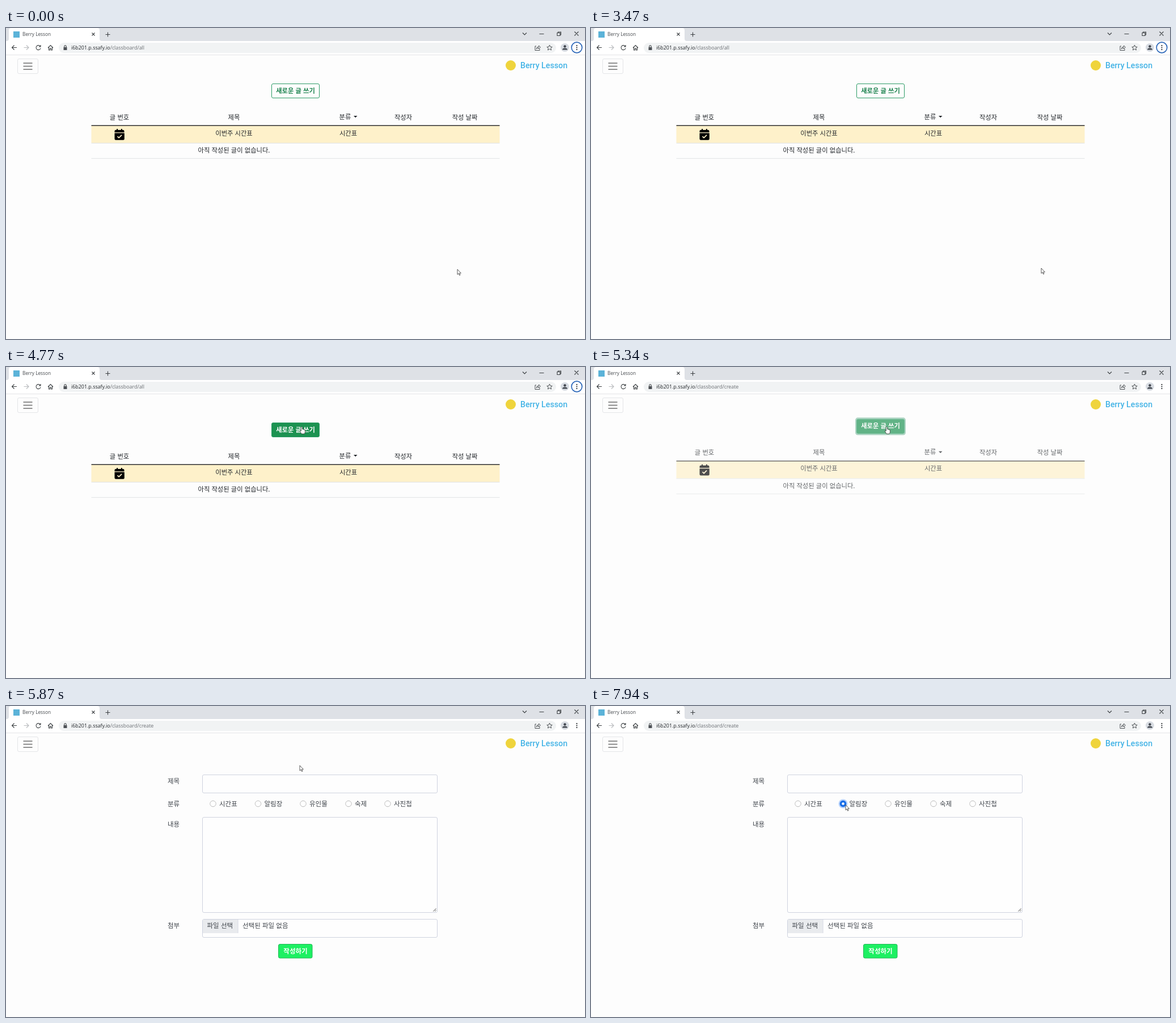
Recreate the animation shown at these times as an HTML page. Size 1021x549 px, loop 8 s.

```html
<!DOCTYPE html>
<html lang="ko">
<head>
<meta charset="utf-8">
<style>
html, body { margin: 0; width: 100%; height: 100%; overflow: hidden; background: #fdfdfd; }
svg { display: block; }
text { font: 11.3px "Noto Sans CJK KR", "Noto Sans CJK", sans-serif; fill: #212529; }
.ui { font-family: "Open Sans", sans-serif; }
.mid { text-anchor: middle; }
.bold { font-weight: 700; }
.line { fill: none; stroke: #3c4043; stroke-width: 1.1; }
.field { fill: #fefefe; stroke: #cfd3df; }
.radio { fill: #fff; stroke: #bdbdbd; }
#form text { fill: #3f444b; font-size: 11.5px; }
</style>
</head>
<body>
<svg width="1021" height="549" viewBox="0 0 1021 549">
  <!-- browser frame -->
  <path fill="#dee1e6" d="M0 0H1021V23H0Z"/>
  <path fill="#fff" d="M0 23H1021V47H0ZM1 23Q5 23 5 19V4Q5 0 9 0H161Q165 0 165 4V19Q165 23 169 23Z"/>
  <path fill="#e3e4e7" d="M0 47H1021V48H0Z"/>
  <rect x="13" y="6" width="11" height="11" fill="#5bb3d8"/>
  <text class="ui" x="29" y="14" style="font-size:8.3px;fill:#45494d">Berry Lesson</text>
  <path class="line" d="M151.500 8.500l5 5m0-5l-5 5M175.500 11.500h8m-4-4v8"/>
  <path class="line" d="M911 8.500l3.500 3.500 3.500-3.500M940.500 10.500h8M1002.500 6.500l7 7m0-7l-7 7"/>
  <path class="line" d="M972 8.500h5v5h-5zM973.500 8V7h5v5h-1"/>
  <rect x="93" y="26" width="877" height="18" rx="9" fill="#f1f3f4"/>
  <path class="line" d="M19 34.500h-8.500m4-4l-4 4 4 4M60.500 32.500a4 4 0 1 0 .5 3m0-5.500v3h-3M74 35l4.500-4.500L83 35M75.500 34v5h2v-3h2v3h2v-5"/>
  <path class="line" style="stroke:#b9bbbe" d="M31.500 34.500H40m-4-4l4 4-4 4"/>
  <path fill="#4d5156" d="M101.500 34h6v5h-6z"/>
  <path class="line" d="M102.800 34v-1.500a1.700 1.700 0 0 1 3.400 0V34"/>
  <text class="ui" x="115" y="38" style="font-size:8.9px">i6b201.p.ssafy.io<tspan id="path" fill="#6b6f74"></tspan></text>
  <path class="line" style="stroke-width:.9" d="M935 32h-2v7.500h8V37M935.500 37q0-4 4-4v-2l3 3-3 3v-2q-2.500 0-4 2z"/>
  <path class="line" style="stroke-width:.9" d="M958.500 30l1.400 3.200 3.300.3-2.500 2.200.8 3.300-3-1.800-3 1.800.8-3.300-2.500-2.200 3.300-.3z"/>
  <circle cx="985.500" cy="34.500" r="7.500" fill="#d9dde3"/>
  <path fill="#42474f" d="M981 38.500q0-3 4.500-3t4.500 3z"/>
  <circle cx="985.500" cy="32.500" r="2.200" fill="#42474f"/>
  <path fill="#3c4043" d="M1005.500 30h2v2h-2zm0 3.500h2v2h-2zm0 3.500h2v2h-2z"/>
  <circle id="menuRing" cx="1006.500" cy="34.500" r="9.300" fill="none" stroke="#2a66b8" stroke-width="1.700"/>

  <!-- site header -->
  <rect x="20.500" y="54.500" width="36" height="26" rx="2.500" fill="none" stroke="#e4e5e8"/>
  <path stroke="#6c6c6c" stroke-width="1.400" d="M30.500 62h16m-16 5.500h16m-16 5.500h16"/>
  <circle cx="890" cy="66" r="9" fill="#efd43c"/>
  <text x="907" y="71" style="font:500 14.200px Roboto,sans-serif;fill:#42b3e6">Berry Lesson</text>

  <g id="list">
    <rect id="ring" x="466" y="95.500" width="89" height="31" rx="4.500" fill="#198754" fill-opacity=".5"/>
    <rect id="write" x="468.500" y="98.500" width="84" height="25" rx="2.500" stroke="#2c9b66"/>
    <text id="writeText" class="mid bold" x="510.500" y="114.500">새로운 글 쓰기</text>
    <g class="bold">
      <text class="mid" x="200" y="161.500">글 번호</text>
      <text class="mid" x="402" y="161.500">제목</text>
      <text class="mid" x="598" y="160.500">분류</text>
      <text class="mid" x="700.500" y="161.500">작성자</text>
      <text class="mid" x="809" y="161.500">작성 날짜</text>
    </g>
    <path fill="#212529" d="M613 155h6.500l-3.250 3.300z"/>
    <path fill="#fef1ca" d="M150.500 172H870.500V203H150.500Z"/>
    <path fill="#2d2d2b" d="M150.500 171.500h720v1.400h-720z"/>
    <path fill="#e0e2e4" d="M150.500 202.800h720v1h-720zm0 27h720v1h-720z"/>
    <path d="M191.500 184.300V182q0-2 2-2h1.500v-1q0-1 1.100-1t1.100 1v1h5.600v-1q0-1 1.100-1t1.100 1v1h1.500q2 0 2 2v2.300zM191.500 185.500h17.300v10.200q0 2-2 2h-13.300q-2 0-2-2z"/>
    <path d="M196.500 191.300l2.600 2.600 5-5" fill="none" stroke="#fef1ca" stroke-width="1.700"/>
    <text class="mid" x="402" y="189.500">이번주 시간표</text>
    <text class="mid" x="603.500" y="189.500">시간표</text>
    <text class="mid" x="402" y="220">아직 작성된 글이 없습니다.</text>
  </g>

  <g id="form">
    <text x="285" y="136.500">제목</text>
    <text x="285" y="176.500">분류</text>
    <text x="285" y="212.500">내용</text>
    <text x="285" y="392">첨부</text>
    <rect class="field" x="346.500" y="121.500" width="414" height="32" rx="2.500"/>
    <rect class="field" x="346.500" y="196.500" width="414" height="168" rx="2.500"/>
    <path stroke="#444" d="M753.500 362.500l5-5m-2 5l2-2"/>
    <rect class="field" x="346.500" y="376.500" width="414" height="32" rx="2.500"/>
    <path fill="#e9ebee" d="M347 377h61.500v24H347z"/>
    <path fill="#cfd3df" d="M408.500 377h1v24h-1z"/>
    <text x="354.500" y="392">파일 선택</text>
    <text x="417" y="392">선택된 파일 없음</text>
    <g id="radios"></g>
    <g id="checked">
      <circle cx="444.500" cy="172.500" r="8" fill="#0d6efd" fill-opacity=".3"/>
      <circle cx="444.500" cy="172.500" r="5.700" fill="#176de8"/>
      <circle cx="444.500" cy="172.500" r="2.300" fill="#fff"/>
    </g>
    <rect x="480.500" y="420.500" width="59.500" height="24.500" rx="2.500" fill="#1df062" stroke="#22b757"/>
    <text class="mid bold" x="510.500" y="436.500" style="fill:#fff">작성하기</text>
  </g>

  <!-- pointer shapes, hot spot at 0,0 -->
  <g id="cursor" fill="#fff" stroke="#333" stroke-width=".8">
    <path id="arrow" d="M0 0V9.200L2.100 7.300 3.600 10.600 5 10 3.500 6.800H6.400Z"/>
    <path id="hand" d="M-1.200 1Q0-1 1.200 1V4.500Q2.300 3.800 3 4.900 4.200 4.300 4.700 5.500 5.900 5.200 5.900 6.600V9Q5.900 11 4.500 12.500H-.5Q-1.500 10.500-3.300 7.700-3.200 6.200-1.200 7.500Z"/>
    <path id="beam" fill="none" d="M-2-5.500H-.5L0-5 .5-5.500H2M0-5V5M-2 5.500H-.5L0 5 .5 5.500H2"/>
  </g>
</svg>
<script>
const $ = id => document.getElementById(id);
const clamp = v => Math.max(0, Math.min(1, v));
const span = (t, from, to) => clamp((t - from) / (to - from));
const smooth = p => p * p * (3 - 2 * p);
const mix = (a, b, p) => a + (b - a) * p;
const blend = (a, b, p) => `rgb(${a.map((v, i) => Math.round(mix(v, b[i], p)))})`;
const show = (id, on) => $(id).style.display = on ? '' : 'none';

const paper = [253, 253, 253], green = [28, 146, 81], ink = [30, 132, 80];
const START = [796, 426];
// [begin, end, x, y]
const moves = [[3440, 3470, 794, 424], [3470, 4720, 521.5, 105.5], [5830, 5865, 518, 105], [6970, 7700, 449, 174.5]];

$('radios').innerHTML = [[365, '시간표'], [444.5, '알림장'], [524, '유인물'], [604, '숙제'], [673, '사진첩']]
  .map(([x, name]) => `<circle class="radio" cx="${x}" cy="172.500" r="5.200"/><text x="${x + 11}" y="176.500">${name}</text>`)
  .join('');

function cursorAt(t) {
  return moves.reduce(([x, y], [from, to, toX, toY]) => {
    const p = smooth(span(t, from, to));
    return [mix(x, toX, p), mix(y, toY, p)];
  }, START);
}

function draw(t) {
  const hover = span(t, 4530, 4680);
  const leave = smooth(span(t, 5230, 5530));
  const enter = span(t, 5560, 5870);
  const [x, y] = cursorAt(t);

  $('path').textContent = '/classboard/' + (t < 5230 ? 'all' : 'create');
  show('menuRing', t < 5100);

  $('list').style.opacity = 1 - leave;
  $('list').setAttribute('transform', `translate(0 ${-20 * leave})`);
  $('write').setAttribute('fill', blend(paper, green, hover));
  $('writeText').style.fill = blend(ink, [255, 255, 255], hover);
  $('ring').style.opacity = span(t, 5100, 5250);

  $('form').style.opacity = enter;
  show('checked', t >= 7800);

  const onButton = t >= 4530 && t < 5560;
  const onField = t > 5900 && y > 121 && y < 154;
  $('cursor').setAttribute('transform', `translate(${x} ${y})`);
  show('hand', onButton);
  show('beam', onField);
  show('arrow', !onButton && !onField);
}

const begin = performance.now();
function tick() {
  draw((performance.now() - begin) % 8000);
  requestAnimationFrame(tick);
}
tick();
</script>
</body>
</html>
```
